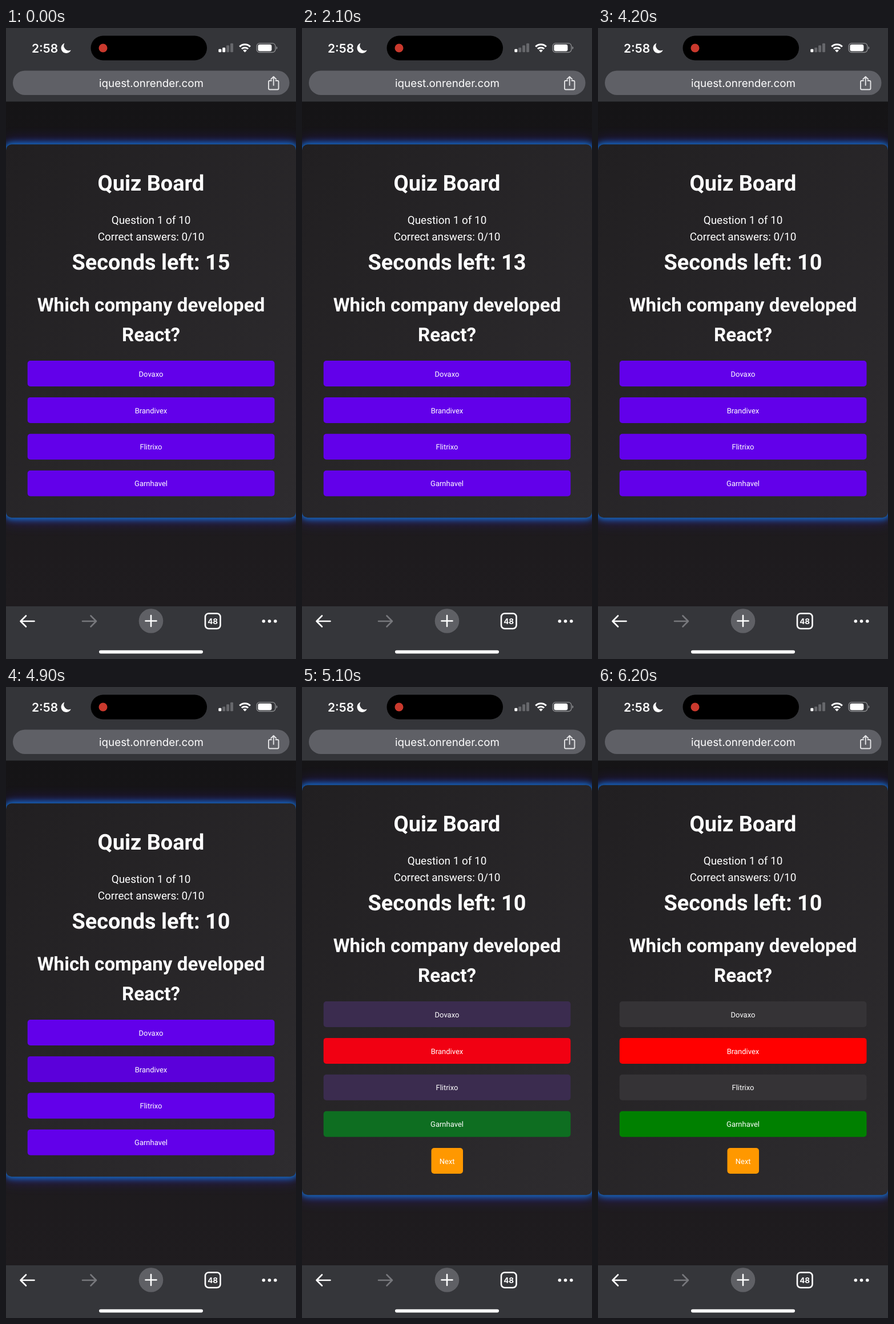
Animation, 508 px wide and 1102 px high, one loop 7.2 s. Source, as an HTML page:

```html
<!DOCTYPE html>
<html lang="en">
<head>
<meta charset="utf-8">
<title>Quiz Board</title>
<style>
html, body { margin: 0; width: 100%; height: 100%; overflow: hidden; background: #1c1a1d; }
svg { display: block; width: 100vw; height: 100vh; }
text { fill: #fff; text-rendering: geometricPrecision; }
.page text { font-family: Roboto, sans-serif; text-anchor: middle; }
.bar text { font-family: Inter, sans-serif; }
.h1 { font-size: 37.9px; font-weight: 700; }
.h2 { font-size: 33.15px; font-weight: 700; }
.info { font-size: 18.95px; }
.btn { font-size: 13px; }
.line { fill: none; stroke: #fff; stroke-width: 2.6; stroke-linecap: round; stroke-linejoin: round; }
</style>
</head>
<body>
<svg viewBox="0 0 508 1102">
  <defs>
    <linearGradient id="back" x1="0" y1="0" x2="0" y2="1">
      <stop offset="0" stop-color="#151416"/>
      <stop offset="1" stop-color="#1f1c1f"/>
    </linearGradient>
    <linearGradient id="panel" x1="0" y1="0" x2="1" y2="1">
      <stop offset="0" stop-color="#211f21"/>
      <stop offset="1" stop-color="#2e2c2f"/>
    </linearGradient>
    <filter id="soft" filterUnits="userSpaceOnUse" x="-60" y="60" width="628" height="940" color-interpolation-filters="sRGB">
      <feGaussianBlur stdDeviation="13"/>
    </filter>
    <filter id="tight" filterUnits="userSpaceOnUse" x="-60" y="60" width="628" height="940" color-interpolation-filters="sRGB">
      <feGaussianBlur stdDeviation="6"/>
    </filter>
  </defs>

  <rect y="128" width="508" height="882" fill="url(#back)"/>
  <g class="page">
    <rect class="card" x="-3" width="514" rx="12" fill="#4620dc" opacity=".5" filter="url(#soft)"/>
    <rect class="card" x="-2" width="512" rx="11" fill="#0d80e0" filter="url(#tight)"/>
    <rect class="card" width="508" rx="10" fill="url(#panel)"/>
    <g id="board">
      <text class="h1" x="254" y="284">Quiz Board</text>
      <text class="info" x="254" y="342">Question 1 of 10</text>
      <text class="info" x="254" y="371">Correct answers: 0/10</text>
      <text class="h1" id="clock" x="254" y="422"></text>
      <text class="h2" x="254" y="495">Which company developed</text>
      <text class="h2" x="254" y="547">React?</text>
      <g id="answers"></g>
      <g id="next">
        <rect x="226.5" y="837" width="55.5" height="45" rx="5" fill="#ff9800"/>
        <text class="btn" x="254.2" y="864.5">Next</text>
      </g>
    </g>
  </g>

  <g class="bar">
    <rect width="508" height="128.5" fill="#343539"/>
    <text x="45" y="42.5" font-size="21" font-weight="600">2:58</text>
    <path d="M102.5 26.5A9 9 0 1 0 113.8 38.5A8.6 8.6 0 0 1 102.5 26.5Z" fill="#fff"/>
    <rect x="148.5" y="13.5" width="203.5" height="43" rx="21.5"/>
    <circle cx="170" cy="35" r="7.5" fill="#c9392d"/>
    <g id="signal"></g>
    <g fill="none" stroke="#fff" stroke-width="3">
      <path d="M409.2 32.6A13 13 0 0 1 427.8 32.6"/>
      <path d="M412.9 36.6A7.6 7.6 0 0 1 424.1 36.6"/>
    </g>
    <path d="M418.5 42.5L415.2 39.2A4.7 4.7 0 0 1 421.8 39.2Z" fill="#fff"/>
    <rect x="439.2" y="26.7" width="32.6" height="15.8" rx="5" fill="none" stroke="#8d8e91" stroke-width="1.3"/>
    <rect x="441.4" y="28.8" width="24" height="11.6" rx="3.2" fill="#fff"/>
    <path d="M473.4 32V37.4Q475.4 36.6 475.4 34.7T473.4 32Z" fill="#8d8e91"/>

    <rect x="12" y="74.5" width="484.5" height="42.5" rx="21.2" fill="#5f6066"/>
    <text x="254.5" y="102.5" font-size="18.8" text-anchor="middle">iquest.onrender.com</text>
    <g class="line" style="stroke:#e4e4e6;stroke-width:1.9">
      <path d="M465 92H462Q460 92 460 94V105.500Q460 107.500 462 107.500H475.500Q477.500 107.500 477.500 105.500V94Q477.500 92 475.500 92H472.500"/>
      <path d="M468.700 100V85.500M464.200 89.500L468.700 85L473.200 89.500"/>
    </g>

    <rect y="1010" width="508" height="92" fill="#35363a"/>
    <path class="line" d="M49.500 1036H26M35 1026.500L25.500 1036L35 1045.500"/>
    <path class="line" style="stroke:#77787c" d="M134 1036H157.500M148.500 1026.500L158 1036L148.500 1045.500"/>
    <circle cx="254" cy="1035.500" r="21.300" fill="#5f6065"/>
    <path class="line" d="M244.500 1035.500H263.500M254 1026V1045"/>
    <rect class="line" x="349" y="1022.500" width="26.500" height="26.500" rx="6"/>
    <text x="362.200" y="1041" font-size="13.500" font-weight="700" text-anchor="middle">48</text>
    <g fill="#fff">
      <circle cx="451.300" cy="1036" r="2.800"/>
      <circle cx="461.500" cy="1036" r="2.800"/>
      <circle cx="471.800" cy="1036" r="2.800"/>
      <rect x="163" y="1086.800" width="182" height="5.600" rx="2.800"/>
    </g>
  </g>
</svg>
<script>
const LOOP = 7200, STEP = 100, PRESS = 4900, REVEAL = 5000;
const VIOLET = [98, 0, 234], PRESSED = [91, 0, 218];
const GREY = [53, 51, 54], RED = [255, 0, 0], GREEN = [0, 128, 0];
const ANSWERS = [
  { name: 'Dovaxo', end: GREY },
  { name: 'Brandivex', end: RED, start: 4905, pressed: true },
  { name: 'Flitrixo', end: GREY },
  { name: 'Garnhavel', end: GREEN }
];

const $ = id => document.getElementById(id);
const clamp = v => Math.max(0, Math.min(1, v));
const mix = (a, b, k) => `rgb(${a.map((v, i) => Math.round(v + (b[i] - v) * k))})`;

function add(parent, tag, attrs, text = '') {
  const el = document.createElementNS('http://www.w3.org/2000/svg', tag);
  for (const key in attrs) el.setAttribute(key, attrs[key]);
  el.textContent = text;
  return parent.appendChild(el);
}

// cubic-bezier(.25, .1, .25, 1), solved by bisection
function ease(x) {
  if (x <= 0 || x >= 1) return clamp(x);
  const curve = (a, b, u) => 3 * a * u * (1 - u) ** 2 + 3 * b * u * u * (1 - u) + u ** 3;
  let lo = 0, hi = 1;
  for (let i = 0; i < 20; i++) {
    const mid = (lo + hi) / 2;
    if (curve(.25, .25, mid) < x) lo = mid; else hi = mid;
  }
  return curve(.1, 1, lo);
}

ANSWERS.forEach((a, i) => {
  const y = 581 + i * 63.9;
  a.box = add($('answers'), 'rect', { x: 37.7, y, width: 432.8, height: 45, rx: 5 });
  add($('answers'), 'text', { class: 'btn', x: 254, y: y + 27.6 }, a.name);
});

const bars = [5.5, 8, 12, 15.5].map((h, i) =>
  add($('signal'), 'rect', { x: 372.3 + i * 6.9, y: 42.3 - h, width: 5, height: h, rx: 1.3, fill: i < 2 ? '#fff' : '#66676b' }));
const cards = document.querySelectorAll('.card');

function draw(time) {
  const t = Math.floor(time / STEP) * STEP;
  const open = t >= REVEAL;
  const shift = open ? 32 : 0;

  cards.forEach((card, i) => {
    const spread = [3, 2, 0][i];
    card.setAttribute('y', 203.3 - shift - spread);
    card.setAttribute('height', 652 + 2 * (shift + spread));
  });
  $('board').setAttribute('transform', `translate(0 ${-shift})`);
  $('next').setAttribute('visibility', open ? 'visible' : 'hidden');

  const ticks = Math.min(5, Math.max(0, Math.floor((t + 800) / 1000)));
  $('clock').textContent = `Seconds left: ${15 - ticks}`;

  for (const a of ANSWERS) {
    const from = a.pressed && t >= PRESS ? PRESSED : VIOLET;
    const k = open ? ease((t - (a.start || 4930)) / 300) : 0;
    a.box.setAttribute('fill', mix(from, a.end, k));
  }
  bars[1].setAttribute('fill', mix([255, 255, 255], [102, 103, 107], clamp((t - 1700) / 400)));
}

function tick() {
  draw(performance.now() % LOOP);
  requestAnimationFrame(tick);
}
tick();
</script>
</body>
</html>
```
